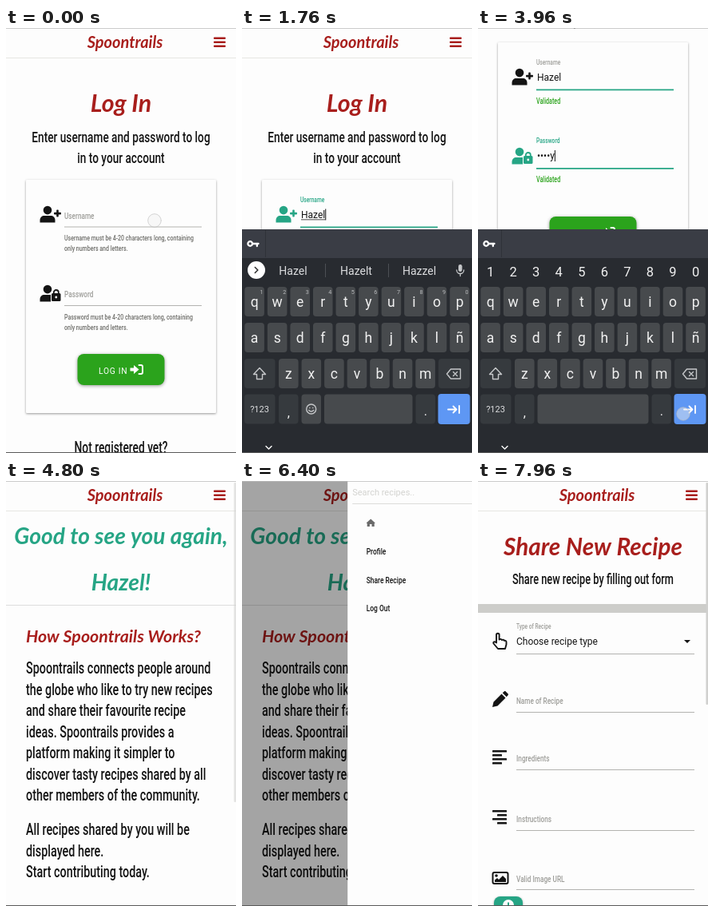
An HTML page with a canvas for the animation above (8 s loop, 288 px wide and 532 px high).

```html
<!DOCTYPE html>
<html lang="en">
<head>
<meta charset="utf-8">
<title>Recipe app walkthrough</title>
<style>
  html, body { margin: 0; width: 288px; height: 532px; overflow: hidden; background: #fdfdfd; }
  canvas { display: block; width: 288px; height: 532px; }
</style>
</head>
<body>
<canvas id="stage"></canvas>
<script>
const W = 288, H = 532, LOOP = 8000;
const APP = 'Spoontrails', USER = 'Hazel', PASS = 'sunny';
const PAPER = '#fdfdfd', INK = '#141414', RED = '#a81e1c', GREEN = '#26a585', LEAF = '#2ba31c',
      FAINT = '#9e9e9a', LINE = '#b3b3b0';
const BOARD = '#282b30', STRIP = '#3a3d45', KEY = '#474a4d', DARK_KEY = '#363a3e',
      BLUE = '#5e97f4', KEY_TEXT = '#f1f1f1', KEY_ICON = '#c6c8ca';

const canvas = document.getElementById('stage');
const ctx = canvas.getContext('2d');
const dpr = window.devicePixelRatio || 1;
canvas.width = W * dpr;
canvas.height = H * dpr;

const seg = (t, a, b) => Math.min(1, Math.max(0, (t - a) / (b - a)));
const easeOut = p => 1 - (1 - p) ** 3;
const easeInOut = p => p * p * (3 - 2 * p);
const mix = (a, b, p) => a + (b - a) * p;

// face: [style, family, horizontal condensation]
const FACES = {
  body: ['500', 'Roboto, "Open Sans", sans-serif', 0.715],
  script: ['italic 700', 'Lato, sans-serif', 1],
  plain: ['400', 'Roboto, sans-serif', 1],
  bold: ['700', 'Roboto, sans-serif', 1]
};

// y is the middle of the capitals
function text(str, x, y, size, color, face = 'body', align = 'left') {
  const [style, family, squeeze] = FACES[face];
  ctx.save();
  ctx.translate(x, y + size * 0.36);
  ctx.scale(squeeze, 1);
  ctx.font = `${style} ${size}px ${family}`;
  ctx.textAlign = align;
  ctx.fillStyle = color;
  ctx.fillText(str, 0, 0);
  ctx.restore();
}
const centred = (str, x, y, size, color, face) => text(str, x, y, size, color, face, 'center');

function rect(x, y, w, h, color, r = 0) {
  ctx.fillStyle = color;
  ctx.beginPath();
  ctx.roundRect(x, y, w, h, r);
  ctx.fill();
}

function disc(x, y, r, color) {
  ctx.fillStyle = color;
  ctx.beginPath();
  ctx.arc(x, y, r, 0, 7);
  ctx.fill();
}

// filled path, or stroked when a line width is given
function icon(d, x, y, color, width) {
  ctx.save();
  ctx.translate(x, y);
  const path = new Path2D(d);
  ctx.lineCap = ctx.lineJoin = 'round';
  if (width) {
    ctx.strokeStyle = color;
    ctx.lineWidth = width;
    ctx.stroke(path);
  } else {
    ctx.fillStyle = color;
    ctx.fill(path);
  }
  ctx.restore();
}

function shadowed(x, y, w, h, color, r, blur) {
  ctx.save();
  ctx.shadowColor = 'rgba(0,0,0,.4)';
  ctx.shadowBlur = blur * dpr;
  ctx.shadowOffsetY = dpr;
  rect(x, y, w, h, color, r);
  ctx.restore();
}

function person(x, y, color) {
  disc(x + 9.5, y + 5.6, 5.3, color);
  icon('M0 21v-3c0-3.5 2.5-5.5 5.5-5.5h8c3 0 5.5 2 5.5 5.5v3z', x, y, color);
}

function navbar() {
  rect(0, 37, W, 1, '#e6e6e2');
  centred(APP, 149, 18, 20, RED, 'script');
  for (const y of [11.5, 16.5, 21.5]) rect(260, y, 15, 2.4, RED, 1);
}

/* ---------- pages ---------- */

function field(y, label, value, { float, active, valid, caret, hint, underlined }) {
  const done = valid || active;
  text(label, 73, mix(y, y - 20, float), mix(11.5, 9.3, float), active ? GREEN : FAINT);
  text(value, 74, y - 1, 12, INK, 'plain');
  ctx.font = '12px Roboto, sans-serif';
  const w = ctx.measureText(value).width;
  if (underlined && value) rect(74, y + 5, w, 0.8, INK);
  if (caret) rect(74 + w, y - 8, 1, 14, INK);
  rect(73, y + 14, 172, done ? 1.7 : 1, done ? GREEN : LINE);
  if (valid) text('Validated', 73, y + 28.5, 10, LEAF);
  else hint.forEach((line, i) => text(line, 73, y + 28 + i * 13, 9.8, '#6c6c68'));
}

function loginPage(t) {
  const scroll = 172 * easeInOut(seg(t, 2440, 2960));
  const onName = t >= 80 && t < 2320, onPass = t >= 2320;
  const typed = typedCount(t, NAME_START), secret = typedCount(t, PASS_START);
  const hint = what => [`${what} must be 4-20 characters long, containing`, 'only numbers and letters.'];

  ctx.save();
  ctx.translate(0, -scroll);
  navbar();
  centred('Log In', 144, 94, 30.4, RED, 'script');
  centred('Enter username and password to log', 144, 136, 19.1, INK);
  centred('in to your account', 144, 162, 19.1, INK);
  shadowed(25, 190, 238, 292, PAPER, 1, 3);

  const nameTone = onName ? GREEN : INK, passTone = onPass ? GREEN : INK;
  person(42.5, 222.5, nameTone);
  rect(60, 230.8, 9, 2.6, nameTone, 1);
  rect(63.2, 227.6, 2.6, 9, nameTone, 1);
  person(42.5, 321.5, passTone);
  rect(56, 330, 13.5, 14, PAPER, 2);
  rect(57, 332, 11.5, 10, passTone, 1.5);
  icon('M0 5V3a3 3 0 0 1 6 0v2', 59.8, 328, passTone, 1.8);
  disc(62.8, 337, 1.4, PAPER);

  field(234.5, 'Username', USER.slice(0, typed), {
    float: easeOut(seg(t, 80, 280)), active: onName, valid: onPass, underlined: onName,
    caret: onName && !(t >= 2080 && t < 2240), hint: hint('Username')
  });
  field(333, 'Password', secret ? '•'.repeat(secret - 1) + PASS[secret - 1] : '', {
    float: easeOut(seg(t, 2320, 2520)), active: onPass, valid: secret > 3,
    caret: onPass && t < 4000, hint: hint('Password')
  });

  shadowed(89.5, 408, 109, 39, LEAF, 8, 4);
  ctx.letterSpacing = '0.7px';
  text('LOG IN', 116, 429.5, 10.3, '#fff', 'plain');
  ctx.letterSpacing = '0px';
  icon('M0 4.5h4.5V1L11 6.5 4.5 12V8.5H0z', 155.5, 421, '#fff');
  icon('M0 0h2.5a2 2 0 0 1 2 2v7a2 2 0 0 1-2 2H0', 166.5, 422, '#fff', 2);
  centred('Not registered yet?', 144, 525, 19.3, INK);
  ctx.restore();
}

const ABOUT = [
  `${APP} connects people around`, 'the globe who like to try new recipes',
  'and share their favourite recipe', `ideas. ${APP} provides a`,
  'platform making it simpler to', 'discover tasty recipes shared by all',
  'other members of the community.'
];
const EMPTY = ['All recipes shared by you will be', 'displayed here.', 'Start contributing today.'];

function profilePage() {
  navbar();
  centred('Good to see you again,', 144, 68.5, 28.2, GREEN, 'script');
  centred(USER + '!', 144, 126.5, 28.2, GREEN, 'script');
  rect(0, 155, W, 1, '#dedede');
  text(`How ${APP} Works?`, 25, 194, 21.4, RED, 'script');
  ABOUT.forEach((line, i) => text(line, 25, 234 + i * 26.5, 20.1, INK));
  EMPTY.forEach((line, i) => text(line, 25, 436 + i * 26.5, 20.1, INK));
}

function bars(x, y, right) {
  [18, 12, 18, 12].forEach((w, i) => rect(right ? x + 18 - w : x, y + i * 5, w, 2.5, INK, 0.6));
}

function sharePage() {
  navbar();
  centred('Share New Recipe', 144, 82, 29.7, RED, 'script');
  centred('Share new recipe by filling out form', 144, 123, 17.9, INK);
  rect(0, 154, W, 11, '#cdcdca');

  text('Type of Recipe', 48, 182, 9.2, FAINT);
  text('Choose recipe type', 48, 201, 12, INK, 'plain');
  icon('M0 0h8l-4 4z', 258, 199, INK);
  [216, 289, 361, 437, 511].forEach(y => rect(48, y, 223, 1, LINE));
  [['Name of Recipe', 274.5], ['Ingredients', 347], ['Instructions', 422.5], ['Valid Image URL', 497.5]]
    .forEach(([label, y]) => text(label, 48, y, 11.5, FAINT));

  icon('M5 12V2a1.8 1.8 0 0 1 3.6 0v6c1-1 3-.8 3.2.6 1-.8 2.8-.5 3 .8 1.5-.6 2.7.2 2.7 1.6v3l-1.5 5.5H7L1.5 13c-1-2 1.5-3.3 3.5-1z', 18, 190.5, INK, 1.9);
  icon('M0 20l1.5-6.5L11.5 3.5l5 5L6.5 18.5z M12.7 2.3l2-1.8c.7-.6 1.4-.6 2 0l2.8 2.8c.6.6.6 1.3 0 2l-1.8 2z', 18, 263, INK);
  bars(18, 337, false);
  bars(18, 412, true);
  icon('M2 0h15a2 2 0 0 1 2 2v10a2 2 0 0 1-2 2H2a2 2 0 0 1-2-2V2a2 2 0 0 1 2-2z', 18.5, 490, INK, 2);
  disc(23, 494, 1.8, INK);
  icon('M0 8V5.5L3 3l2 2 5-5 4 4v4z', 21, 494, INK);

  shadowed(20, 520, 36, 24, GREEN, 8, 3);
  disc(38, 531, 7, '#fff');
  rect(37, 527.5, 2, 6, GREEN);
}

function drawer(p) {
  rect(0, 0, W, H, `rgba(0,0,0,${0.5 * p})`);
  ctx.save();
  ctx.translate(220 * (1 - p), 0);
  rect(68, 0, 220, H, PAPER);
  text('Search recipes..', 74, 14, 11, '#d3d3d0', 'plain');
  rect(74, 28, 169, 1, '#dcdcda');
  shadowed(245.5, 5, 36.5, 23, GREEN, 9, 2);
  icon('M7.5 4a3.5 3.5 0 1 1-7 0a3.5 3.5 0 1 1 7 0M6.5 6.5l4 4', 258, 11, '#fff', 2.2);
  icon('M0 5.5L5.5.5 11 5.5l-1 .8V10H6.8V7H4.2v3H1V6.3z', 91.5, 47, '#6a6a6a');
  ['Profile', 'Share Recipe', 'Log Out'].forEach((item, i) => text(item, 91.5, 88 + i * 35.3, 11.8, INK));
  ctx.restore();
}

/* ---------- keyboard ---------- */

const ROWS = ['qwertyuiop', 'asdfghjklñ', 'zxcvbnm'];
const PITCH = 28.55, NAME_START = 920, PASS_START = 3080, TYPE_GAP = 180;
const keyAt = (row, i) => [(row === 2 ? 58.3 : 15.6) + i * PITCH, 342.5 + row * 45];
const typedCount = (t, start) => Math.min(5, Math.max(0, Math.floor((t - start) / TYPE_GAP) + 1));
const SUGGESTIONS = [['H', 'Hi', 'He'], ['Ha', 'Has', 'Had'], ['Haz', 'Haze', 'Hazy'],
                     ['Haze', 'Hazed', 'Hazes'], [USER, 'Hazelt', 'Hazzel']];

function mic() {
  rect(271, 296, 4.6, 9, KEY_ICON, 2.3);
  icon('M0 0a4.5 4.5 0 0 0 9 0M4.5 4.5v3', 268.8, 303, KEY_ICON, 1.3);
}

function gear(x, y, color) {
  for (let i = 0; i < 8; i++) {
    const a = i * Math.PI / 4;
    disc(x + 4.6 * Math.cos(a), y + 4.6 * Math.sin(a), 1.3, color);
  }
  disc(x, y, 4.6, color);
  disc(x, y, 2.1, BOARD);
}

function toolbar(count, secret) {
  if (secret) {
    [...'1234567890'].forEach((n, i) => centred(n, 15.6 + i * PITCH, 305, 16.5, KEY_TEXT, 'plain'));
    return;
  }
  const c = '#b4b6b9';
  disc(18, 303, 11, '#fff');
  icon(count ? 'M0 0l3.5 3.5L0 7' : 'M3.5 0L0 3.5 3.5 7', 16.3, 299.5, '#333', 1.6);
  mic();
  if (count) {
    SUGGESTIONS[count - 1].forEach((word, i) => centred(word, 64 + i * 79, 304, 14, '#dcdddf', 'plain'));
    for (const x of [104, 183]) rect(x, 295, 1, 17, '#4c4f54');
    return;
  }
  icon('M2 0h8a2 2 0 0 1 2 2v6l-4 4H2a2 2 0 0 1-2-2V2a2 2 0 0 1 2-2zM12 8H8v4M3 4h.5M8 4h.5M3 7q2 2 4 0', 50, 297.5, c, 1.4);
  centred('GIF', 97, 303.5, 10.8, c, 'bold');
  icon('M0 1h10v12H0zM3 0h4v3H3zM2.5 6h5M2.5 9h4', 134, 297, c, 1.4);
  gear(180.5, 303.5, c);
  rect(206, 295, 1, 17, '#3c3f44');
  for (const x of [227.5, 232, 236.5]) disc(x, 303.5, 1.3, c);
}

function keyboard(t) {
  const rise = easeOut(seg(t, 160, 440)) - easeInOut(seg(t, 4000, 4240));
  if (rise <= 0) return;
  const count = typedCount(t, NAME_START), secret = t >= 2360, upper = !count;

  ctx.save();
  ctx.translate(0, 280 * (1 - rise));
  rect(0, 252, W, 280, BOARD);
  rect(0, 252, W, 36, STRIP);
  rect(29, 253, 1, 34, '#2f3238');
  icon('M6.5 4.5a2.8 2.8 0 1 1-5.6 0a2.8 2.8 0 1 1 5.6 0M6.5 4.5H14M12.3 4.5v3', 6.5, 265.5, '#fff', 2.3);
  toolbar(count, secret);

  ROWS.forEach((row, r) => [...row].forEach((ch, i) => {
    const [x, y] = keyAt(r, i);
    rect(x - 12.3, y - 18.5, 24.6, 37, KEY, 4);
    centred(upper ? ch.toUpperCase() : ch, x, y + 0.5, 17.5, KEY_TEXT, 'plain');
    if (!r && !secret) centred(String((i + 1) % 10), x + 9, y - 12.5, 7.2, '#b9bbbd', 'plain');
  }));

  const shift = 'M8 0l7.5 8H11.5v6h-7V8H.5z';
  rect(3, 414, 38.5, 37, DARK_KEY, 4);
  icon(shift, 14, 425.5, KEY_ICON, 1.4);
  if (upper) icon(shift, 14, 425.5, KEY_ICON);
  rect(246, 414, 39, 37, DARK_KEY, 4);
  icon('M5 0h12v12H5L0 6zM8 3.5l5 5M13 3.5l-5 5', 256.5, 427, KEY_ICON, 1.4);

  rect(3, 458.5, 38.5, 37, DARK_KEY, 4);
  centred('?123', 22, 477.5, 11, '#dcdddf', 'plain');
  rect(46, 458.5, 24.5, 37, DARK_KEY, 4);
  centred(',', 58.3, 481, 16, KEY_TEXT, 'plain');
  const spaceX = secret ? 74.5 : 103;
  if (!secret) {
    rect(74.5, 458.5, 24.5, 37, KEY, 4);
    icon('M12 6a6 6 0 1 1-12 0a6 6 0 1 1 12 0M4 4.5h.1M8 4.5h.1M3 7.5q3 3 6 0', 80.7, 471, KEY_ICON, 1.4);
  }
  rect(spaceX, 458.5, 213.5 - spaceX, 37, KEY, 4);
  rect(217.5, 458.5, 24.5, 37, DARK_KEY, 4);
  centred('.', 229.8, 479, 16, KEY_TEXT, 'plain');
  rect(245.5, 458, 40, 38, BLUE, 4);
  icon('M0 4.5h10M6.5 0.5l4 4-4 4M14 0v9', 258, 473, '#fff', 1.8);
  icon('M0 0l3.5 3.5L7 0', 30, 523.5, '#fff', 1.4);
  ctx.restore();
}

/* ---------- touches and timeline ---------- */

const typing = (word, start) => [...word].map((ch, i) => {
  const row = ROWS.findIndex(r => r.includes(ch));
  return [start + i * TYPE_GAP, ...keyAt(row, ROWS[row].indexOf(ch)), 40];
});

// [time, x, y, hold]
const TOUCHES = [
  [0, 186, 241, 80], ...typing(USER.toLowerCase(), NAME_START), [2240, 257, 483, 80],
  ...typing(PASS, PASS_START), [3960, 257, 483, 80], [6240, 267, 18, 80], [7080, 203, 134, 160]
];

function touches(t) {
  for (const [at, x, y, hold] of TOUCHES) {
    if (t < at) continue;
    ctx.globalAlpha = 1 - seg(t, at + hold, at + hold + 80);
    disc(x, y, 8.3, 'rgba(240,240,240,.45)');
    icon('M8.3 0a8.3 8.3 0 1 1-16.6 0a8.3 8.3 0 1 1 16.6 0', x, y, 'rgba(185,185,185,.6)', 1);
    ctx.globalAlpha = 1;
  }
}

function scrollbar(t, from, to, length) {
  ctx.globalAlpha = 1 - seg(t, from, to);
  rect(285.5, 2, 2.5, length, '#d0d0ce', 1);
  ctx.globalAlpha = 1;
}

function draw(t) {
  ctx.setTransform(dpr, 0, 0, dpr, 0, 0);
  rect(0, 0, W, H, PAPER);
  if (t < 4600) {
    loginPage(t);
    keyboard(t);
  } else if (t < 7720) {
    profilePage();
    scrollbar(t, 4680, 4960, 400);
    const open = easeOut(seg(t, 6300, 6600));
    if (open > 0) drawer(open);
  } else {
    sharePage();
    scrollbar(t, 8000, 8300, 278);
  }
  touches(t);
  rect(0, 0, W, 0.8, '#bbb');
  rect(0, 531, W, 1, '#5a5a5a');
}

const start = performance.now();
function tick() {
  draw((performance.now() - start) % LOOP);
  requestAnimationFrame(tick);
}
tick();
</script>
</body>
</html>
```
